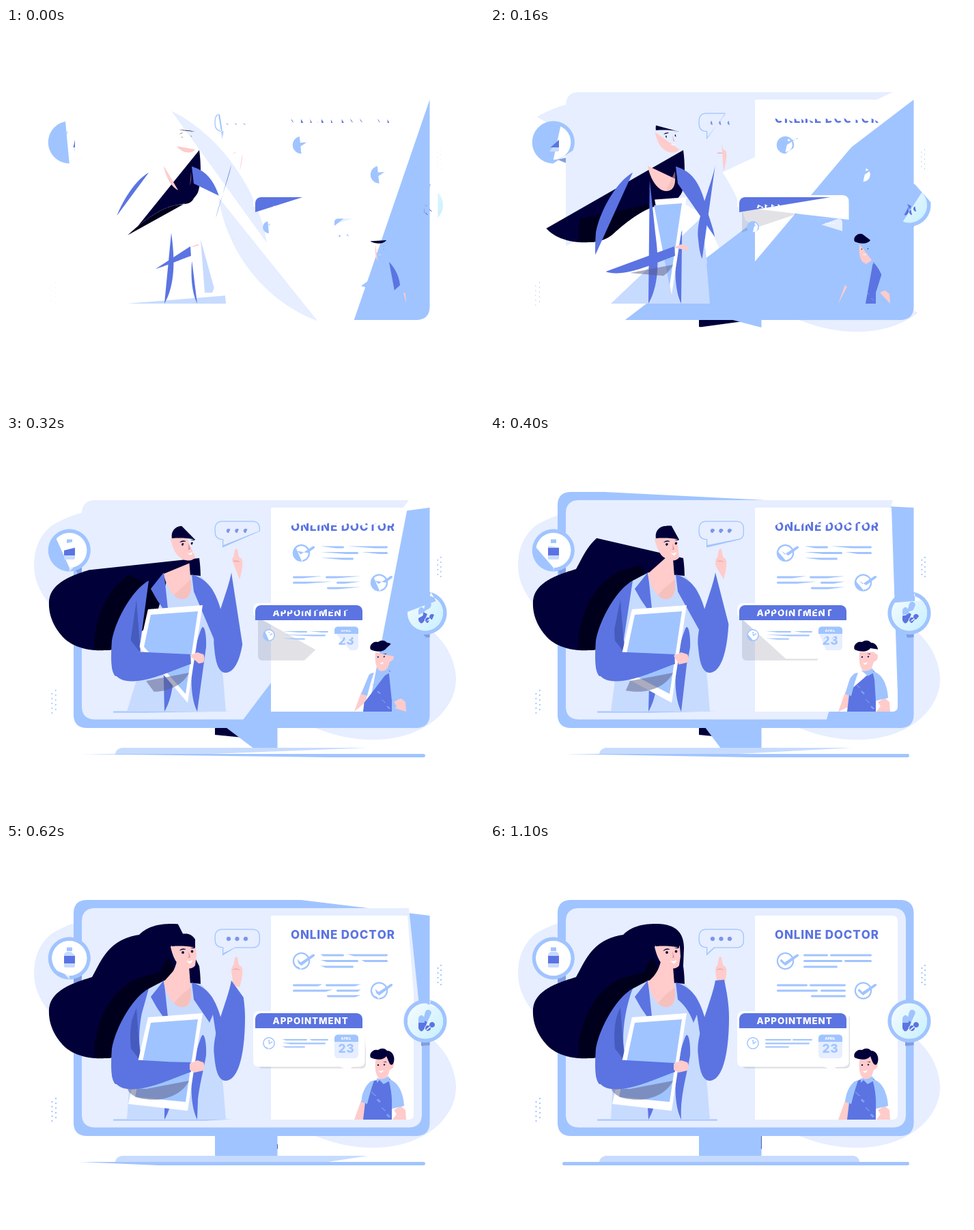
An HTML page with a canvas for the animation above (1600 ms loop, 700 by 557 pixels).

```html
<!DOCTYPE html>
<html lang="en">
<head>
<meta charset="utf-8">
<title>Online doctor</title>
<style>
html, body { margin: 0; width: 100%; height: 100%; overflow: hidden; background: #fff; }
canvas { display: block; width: 700px; height: 557px; }
</style>
</head>
<body>
<canvas id="stage" width="700" height="557"></canvas>
<script>
const ctx = document.getElementById('stage').getContext('2d');
const SKY = '#a0c4ff', PALE = '#e6eeff', COAT = '#c7dbff', ROYAL = '#5b74e2',
      NAVY = '#020039', SKIN = '#ffcbcb', WHITE = '#fff';
const LOOP = 1600, STEP = 20;
const FONT = 'Inter, "Open Sans", sans-serif';

// share of every outline that is drawn, over time
const KEYS = [[0, .25], [80, .33], [160, .433], [320, .635], [480, .797], [800, .957], [1100, 1]];

function slope(i) {
  const a = KEYS[Math.max(i - 1, 0)], b = KEYS[Math.min(i + 1, KEYS.length - 1)];
  return i === KEYS.length - 1 ? 0 : (b[1] - a[1]) / (b[0] - a[0]);
}

function progress(t) {
  const i = KEYS.findIndex(k => k[0] > t) - 1;
  if (i < 0) return 1;
  const [t0, p0] = KEYS[i], [t1, p1] = KEYS[i + 1];
  const d = t1 - t0, u = (t - t0) / d, v = 1 - u;
  return v * v * (1 + 2 * u) * p0 + u * u * (3 - 2 * u) * p1
       + d * u * v * (v * slope(i) - u * slope(i + 1));
}

const pen = document.createElementNS('http://www.w3.org/2000/svg', 'path');

function sample(d) {
  pen.setAttribute('d', d);
  const len = pen.getTotalLength(), n = Math.max(16, Math.ceil(len / .8)), pts = [];
  for (let i = 0; i <= n; i++) {
    const q = pen.getPointAtLength(len * i / n);
    pts.push([q.x, q.y]);
  }
  return pts;
}

// outline up to share p, closed by a straight chord
function trace(pts, p) {
  const end = p * (pts.length - 1), n = Math.floor(end), f = end - n;
  ctx.moveTo(...pts[0]);
  for (let i = 1; i <= n; i++) ctx.lineTo(...pts[i]);
  if (f > 0) {
    const a = pts[n], b = pts[n + 1];
    ctx.lineTo(a[0] + (b[0] - a[0]) * f, a[1] + (b[1] - a[1]) * f);
  }
  ctx.closePath();
}

const items = [];

function add(fill, d) {
  const subs = d.match(/M[^M]+/g).map(sample);
  items.push(p => {
    ctx.beginPath();
    subs.forEach(s => trace(s, p));
    ctx.fillStyle = fill;
    ctx.fill('evenodd');
  });
}

function arcs(x, y, r, deg, cw) {
  const a = deg * Math.PI / 180, dx = r * Math.cos(a), dy = r * Math.sin(a);
  const half = s => `A${r},${r} 0 0 ${cw} ${x + s * dx},${y + s * dy}`;
  return `${x + dx},${y + dy}${half(-1)}${half(1)}`;
}
const circle = (x, y, r, deg = 90, cw = 1) => `M${arcs(x, y, r, deg, cw)}Z`;
const dots = (fill, r, list) => add(fill, list.map(([x, y]) => circle(x, y, r)).join(''));

function ring(x, y, R, r, deg = 90, cw = 1) {
  add(SKY, `M${arcs(x, y, R, deg, cw)}L${arcs(x, y, r, deg, 1 - cw)}Z`);
}
function dial(x, y, R, r) {
  ring(x, y, R, r);
  add(WHITE, circle(x, y, r, 90, 0));
}

// rounded bar; the first end given is where the outline starts
function bar(x1, x2, y, h = 3, fill = SKY) {
  const r = h / 2, s = x2 > x1 ? 1 : -1, sw = s > 0 ? 1 : 0;
  add(fill, `M${x1 + s * r},${y - r}L${x2 - s * r},${y - r}A${r},${r} 0 0 ${sw} ${x2 - s * r},${y + r}` +
            `L${x1 + s * r},${y + r}A${r},${r} 0 0 ${sw} ${x1 + s * r},${y - r}Z`);
}

function text(str, x, y, size, gap, fill) {
  const font = `800 ${size}px ${FONT}`, cap = size * .78;
  let glyphs;
  const layout = () => {
    let at = x;
    ctx.font = font;
    return [...str].map(ch => {
      const w = ctx.measureText(ch).width, left = at, right = at + w, mid = y - cap * .55;
      at += w + gap;
      return { ch, left, box: sample(`M${left},${mid}L${left},${y + 1}L${right},${y + 1}` +
                                     `L${right},${y - cap}L${left},${y - cap}Z`) };
    });
  };
  items.push(p => {
    glyphs = glyphs || layout();
    ctx.font = font;
    ctx.fillStyle = fill;
    for (const g of glyphs) {
      ctx.save();
      ctx.beginPath();
      trace(g.box, p);
      if (p < 1) ctx.clip();
      ctx.fillText(g.ch, g.left, y);
      ctx.restore();
    }
  });
}

// backdrop
add(PALE, 'M382,315C368,232 310,155 243,122C195,98 125,98 69,130C48,145 41,168 41,190C42,240 85,268 130,300C170,375 230,415 300,405C345,395 372,365 382,315Z');
add(PALE, 'M311,248C325,335 385,405 461,431C525,455 595,449 635,410C652,392 659,375 659,355C657,315 630,285 600,270C540,210 500,155 420,160C360,165 320,200 311,248Z');
for (const [x, y, n] of [[73, 373, 5], [67.5, 378, 5], [637, 178, 5], [632.5, 182, 4]])
  dots(SKY, 1.2, Array.from({ length: n }, (_, i) => [x, y + i * 7]));

// monitor
add(COAT, 'M530,457L172,457C165,457 160,461 160,467L541,467C541,461 537,457 530,457Z');
bar(106, 614, 468.5, 5);
add(NAVY, 'M385,428L306,428L306,438L398,447L398,428Z');
add(SKY, 'M306,415L397.5,415L397.5,457L306,457Z');
add(SKY, 'M620.5,105L620.5,408Q620.5,428 600,428L119,428Q99,428 99,408L99,102Q99,82 119,82L600,82Q620.5,82 620.5,102Z');
add(PALE, 'M590,94L131,94Q111,94 111,114L111,396Q111,415.5 131,415.5L589,415.5Q609,415.5 609,396L609,113Q609,94 590,94Z');
add(WHITE, 'M588,105L388,105L388,404L589,404Q597,404 597,396L597,113Q597,105 588,105Z');
add('#819de0', 'M99,193L111,190L111,202L99,203Z');
add('#819de0', 'M608,287L620.5,285L620.5,295L608,296Z');

// medicine badges
ring(92.8, 167.5, 31, 25.5);
add(WHITE, circle(92.8, 167.5, 25.5, 90, 0));
add(SKY, 'M89,157L89,151.5L97,151.5L97,157Z');
add(COAT, 'M101,163L101,179Q101,181 99,181L87,181Q85,181 85,179L85,163Q85,160 89,158L97,158Q101,160 101,163Z');
add(ROYAL, 'M101,164L101,175L85,175L85,164Z');
ring(614, 259.5, 31.5, 26, -75, 0);
{
  const g = ctx.createLinearGradient(590, 240, 640, 280);
  g.addColorStop(0, '#f3fbff');
  g.addColorStop(1, '#c9f0ff');
  add(g, circle(614, 259.5, 26, -45));
}
add(SKY, 'M611,258L614,246Q617,241 621,244Q624,246 622,250L617,261Z');
add(ROYAL, 'M611,258L617,261L615,266Q612,271 609,266Z');
add(SKY, 'M604,262L604,255Q608,247 613,255L613,262Z');
add(ROYAL, 'M613,262L613,270Q608,279 604,270L604,262Z');
dots(ROYAL, 4, [[618, 270], [624, 265]]);
add(WHITE, 'M615,272L621,267L622,268L616,273Z');

// right page
text('ONLINE DOCTOR', 417, 139.3, 17, .85, ROYAL);
for (const [x, y] of [[432.5, 171.5], [546.5, 215]]) {
  dial(x, y, 12.7, 10.2);
  add(SKY, `M${x - 6},${y - 3}L${x - 1},${y + 2}L${x + 17},${y - 10}Q${x + 21},${y - 10} ${x + 19},${y - 7}L${x},${y + 7}L${x - 8},${y}Z`);
}
for (const [a, b, y] of [[459, 495, 163], [498, 559, 163], [459, 516, 171.5], [519, 559, 171.5], [459, 509, 180],
                         [465, 420, 207], [521, 468, 207], [480, 420, 215], [521, 484, 215], [521, 470, 223]])
  bar(a, b, y);

// hair
const under = 'C268,262 255,256 240,262C220,268 195,288 180,302C170,311 155,314 145,314';
add(NAVY, 'M283,179C286,200 286,232 280,243' + under + 'C115,316 92,306 81,292C68,277 62,260 63,242C65,214 100,203 126,195C140,170 150,140 195,133C208,120 225,117 243,117C270,117 284,128 284,153Z');
add('#01001c', 'M275,250' + under + 'L130,313C126,280 145,215 195,196L225,188L238,165Z');

// coat
bar(333, 157, 404.5, 2);
add(COAT, 'M177,404L322,404L318,355L303,225L285,205L232,200L209,212C190,240 180,330 177,404Z');
add(COAT, 'M285,310L291,388L302,388L318,345L303,225L285,205Z');
add(ROYAL, 'M232,404C250,372 246,330 242,300L233,215L231,200L212,224L221,240L236,262L231,385Z');
add(ROYAL, 'M280,404C268,380 268,330 285,285C290,270 294,292 293,310C288,340 278,370 280,404Z');
add(SKIN, 'M231,202C234,220 245,239 258,239C267,239 272,232 271,218L268,180L250,172C247,186 240,195 231,202Z');
add('rgba(237,181,176,.5)', 'M271,210C273,232 266,239 258,239C253,239 249,237 246,233L256,222Z');
add(NAVY, 'M331,305L335,327C328,328 327,315 331,305Z');
add(ROYAL, 'M275,228L272,203C295,210 308,225 318,268C325,290 331,305 331,325L318,346L303,250L298,262Q290,240 275,228Z');
add(SKIN, 'M342,210C345,200 347,188 346,183C345,178 342,179 341,177L339,167C338,164 336,165 335,168L333,178C329,181 330,188 331,192L333,210Z');
add('#e9a9ab', 'M332,184Q337,181 342,184L342,185Q337,183 332,185Z');
add(ROYAL, 'M330,200C325,230 300,280 305,310C307,335 312,347 322,347C345,345 350,290 350,255C350,230 345,210 343,199Z');
add(ROYAL, 'M209,212C185,225 160,270 155,300C153,330 154,345 160,352C180,348 202,325 197,305C192,280 198,240 209,212Z');
add('#465bbe', 'M191,240L197,318L183,300C181,280 182,255 191,240Z');

// clipboard and arm
add(WHITE, 'M266,391L288,248L208,254L179,381Z');
add(SKY, 'M263,378L281,257L212,262L189,371Z');
add('rgba(90,90,130,.5)', 'M205,359L268,347C258,368 230,378 205,374C190,373 178,365 178,358Z');
add(ROYAL, 'M270,320L271,334C240,345 200,365 172,358C150,350 152,330 165,315L270,321Z');
add(SKIN, 'M269,322L280,317L289,320Q292,325 289,332L276,335L269,331Z');

// face
add(SKIN, 'M277,178C273,184 262,184 255,178C248,174 244,163 241,151C248,140 270,140 278,150L279,165Z');
add(NAVY, 'M277,152C265,149 252,149 243,150C241,140 248,132 257,132C266,130 273,133 277,140Z');
dots(NAVY, 1.9, [[259, 159], [272.5, 157.5]]);
add(NAVY, 'M254,156Q258,152 263,154L263,155Q258,154 254,157Z');
add(NAVY, 'M270,153L277,151L276,153Z');
add('#d98a95', 'M267,157L270,166L266,167L268,165Z');
add(WHITE, 'M264,171Q269,173 273,170Q272,176 268,175Z');

// speech bubble
add(SKY, 'M317,163.5L317,152Q305.5,152 305.5,140L305.5,136Q306,124.5 317,124.5L361,124.5Q372,125 372,136L372,141Q372,152.5 361,152.5L329,152.5Z' +
         'M318.3,160L318.3,151Q306.8,151 306.8,140L306.8,136Q307,125.8 317,125.8L361,125.8Q370.7,126 370.7,136L370.7,141Q370.7,151.2 361,151.2L328,151.2Z');
dots('#7b96ec', 3.2, [[326, 139], [338.5, 139], [351, 139]]);

// appointment card
add('rgba(50,50,80,.14)', 'M522,248L376,248Q369,248 369,255L369,321Q369,329 376,329L520,329Q527,329 527,322L527,254Z');
add(WHITE, 'M362,262L362,255Q362,245 372,245L515,245Q525.5,245 525.5,255L525.5,319Q525.5,326 517,326.5L506,327L505,333L489,326.5L370,326.5Q362,326 362,318Z');
add(ROYAL, 'M365,270L365,258Q365,248 375,248L512,248Q522,248 522,258L522,270Z');
text('APPOINTMENT', 390.5, 263.5, 13.3, .95, WHITE);
dial(385, 292, 8.8, 7.2);
add(SKY, 'M384.3,287L386,287L386,291.5L390,289L390.5,290.3L385,293.8Z');
for (const [a, b, y] of [[403, 441, 287], [443, 472, 287], [403, 468, 292.3], [403, 438, 297.5]])
  bar(a, b, y, 2.2);
add(PALE, 'M481,287L481,285Q481,279.5 487,279.5L510,279.5Q516,279.5 516,285L516,308Q516,314 510,314L487,314Q481,314 481,308Z');
add(SKY, 'M481,290L481,285Q481,279.5 487,279.5L510,279.5Q516,279.5 516,285L516,290Z');
text('APRIL', 490.5, 287, 5, .1, WHITE);
text('23', 486.5, 306, 17.5, .5, SKY);

// boy
add(SKIN, 'M510,404L520,376L529,380L524,404Z');
add(SKIN, 'M586,404L585,390L578,384L568,390L572,396L566,404Z');
add(ROYAL, 'M561,343C570,352 576,365 577,377L565,388L565,404L523,404L527,370L533,349L548,343Z');
add(SKY, 'M520,378L529,381C532,369 535,358 539,347L534,348C526,354 521,366 520,378Z');
add(SKY, 'M565,388L583,384C582,365 574,347 560,345Q566,365 565,388Z');
const flecks = Array.from({ length: 18 }, (_, i) => [532 + i * 7 % 29, 356 + i * 11 % 45]);
add('#a0b8fa', flecks.map(([x, y], i) => {
  const s = i % 2 ? 1.5 : -1.5;
  return `M${x},${y}L${x + 2.5},${y + s}L${x + 2.5},${y + s + 1}L${x},${y + 1}Z`;
}).join(''));
add(SKIN, 'M541,317C540,330 541,342 550,346C558,345 560,338 562,331C570,329 569,318 564,319L558,309Z');
add(SKY, 'M543,343Q552,347 560,340L562,347L553,352L547,346L543,350Z');
add(NAVY, 'M557,311C552,318 540,316 534,313C531,307 538,300 545,302C550,298 556,300 558,303C566,303 571,313 567,322C563,327 560,320 557,311Z');
dots(NAVY, 1.2, [[545, 324], [554, 323.5]]);
add(NAVY, 'M552,320L557,319L557,320Z');
add(WHITE, 'M545,332Q549,334 553,331Q551,336 548,335Z');

function draw() {
  const t = performance.now() % LOOP;
  const p = progress(Math.floor(t / STEP) * STEP);
  ctx.fillStyle = WHITE;
  ctx.fillRect(0, 0, 700, 557);
  items.forEach(paint => paint(p));
  requestAnimationFrame(draw);
}
draw();
</script>
</body>
</html>
```
